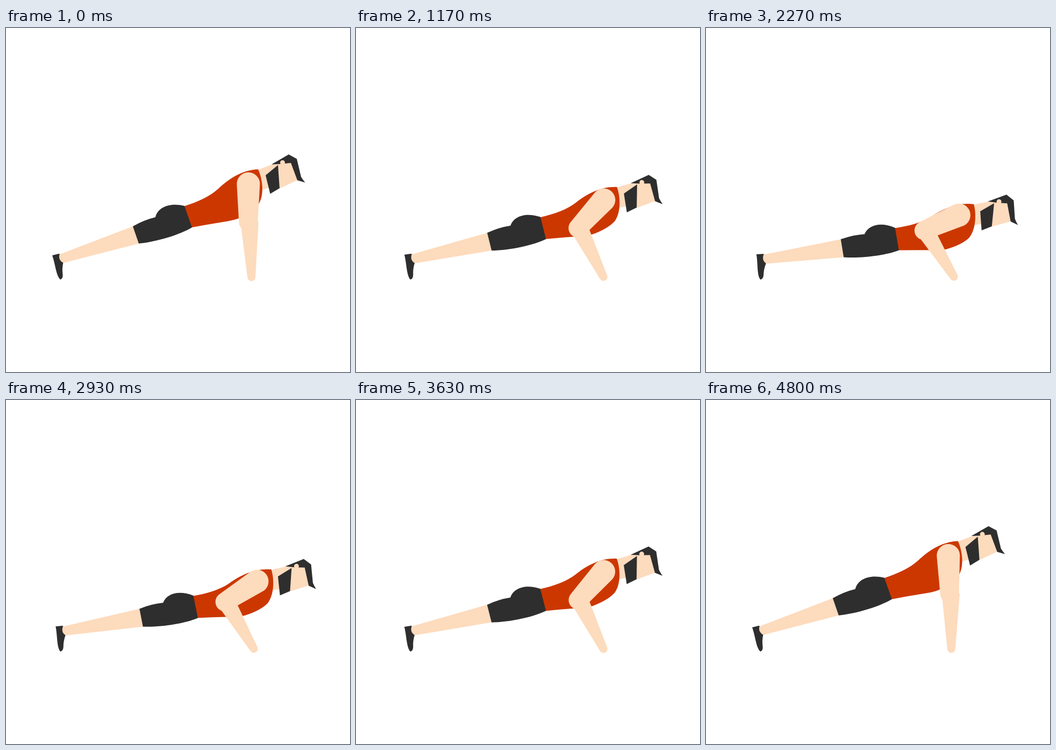
Recreate the animation shown at these times as an HTML page with a canvas. Size 640 by 640 pixels, loop 4830 ms.

```html
<!DOCTYPE html>
<html lang="en">
<head>
<meta charset="utf-8">
<title>Push-up</title>
<style>
html, body { margin: 0; width: 100%; height: 100%; overflow: hidden; background: #fff; }
canvas { display: block; }
</style>
</head>
<body>
<canvas id="stage" width="640" height="640"></canvas>
<script>
const ctx = document.getElementById('stage').getContext('2d');
const LOOP = 4830, LOWEST = 2390, SPEED = 0.00426; // ms, ms, degrees per ms
const SKIN = '#fddbbd', RED = '#cc3700', DARK = '#2e2e2e';
const TOE = { x: 101, y: 468 }, SHOULDER = { x: 450, y: 283.5 }, WRIST = { x: 457.6, y: 454.5 };
const UPPER = 77.55, FORE = 93.67;

// Body in its raised pose, back to front
const body = [
  [DARK, 'M86,423 L98,420 Q101,420 100,424 L106.5,436 Q104,448 105.5,458 Q106.5,466 101,468 C93,460 92,440 86,423Z'],
  [SKIN, 'M100,421 L238,368.2 L249,400.5 L107,437 Q98,433 99,423Z'],
  [SKIN, 'M466,265 L497,253 L531,251 L542,283 L508,299 L490,297 L473,302Z'],
  [RED, 'M330,332 C356,324 380,313 395,299 C415,280 440,264 469,263 C477,280 481,308 471,326 Q460,341 433,354 Q424,358 400,361.5 Q372,366 344,371.3Z'],
  [DARK, 'M236,369 Q257,357 278,352 C282,334 304,324 332,331 L346,371 C325,384 280,398 247,401Z'],
  [DARK, 'M494,253.7 L526,235.3 L541,243.5 L549,277 Q552,282 556.5,287.5 L542,283.3 L530,251 L511,253Z'],
  [DARK, 'M506,255 L483,274 L491.5,308.5 L509,298Z'],
  [SKIN, 'M510,250.5 a4.5,4.5 0 1 1 9,0 a4.5,4.5 0 1 1 -9,0Z']
].map(([color, d]) => [color, new Path2D(d)]);

function drawBody(angle) {
  ctx.save();
  ctx.translate(TOE.x, TOE.y);
  ctx.rotate(angle);
  ctx.translate(-TOE.x, -TOE.y);
  for (const [color, path] of body) {
    ctx.fillStyle = color;
    ctx.fill(path);
  }
  ctx.restore();
}

// Draws a limb whose bone runs along +x from the joint
function drawLimb(joint, angle, trace) {
  ctx.save();
  ctx.translate(joint.x, joint.y);
  ctx.rotate(angle);
  ctx.beginPath();
  trace();
  ctx.fill();
  ctx.restore();
}

// Two-bone arm: the shoulder rides on the body, the wrist stays planted
function drawArm(bodyAngle) {
  const dx = SHOULDER.x - TOE.x, dy = SHOULDER.y - TOE.y;
  const cos = Math.cos(bodyAngle), sin = Math.sin(bodyAngle);
  const shoulder = { x: TOE.x + dx * cos - dy * sin, y: TOE.y + dx * sin + dy * cos };
  const reachX = WRIST.x - shoulder.x, reachY = WRIST.y - shoulder.y;
  const reach = Math.min(Math.hypot(reachX, reachY), UPPER + FORE);
  const bend = Math.acos(Math.min(1, (UPPER ** 2 + reach ** 2 - FORE ** 2) / (2 * UPPER * reach)));
  const upperAngle = Math.atan2(reachY, reachX) + bend;
  const elbow = {
    x: shoulder.x + UPPER * Math.cos(upperAngle),
    y: shoulder.y + UPPER * Math.sin(upperAngle)
  };
  const foreAngle = Math.atan2(WRIST.y - elbow.y, WRIST.x - elbow.x);
  const quarter = Math.PI / 2;

  ctx.fillStyle = SKIN;
  drawLimb(elbow, foreAngle, () => {
    ctx.moveTo(0, 14.5);
    ctx.lineTo(0, -19);
    ctx.arc(102.5, 1.6, 7.5, -quarter, quarter);
  });
  drawLimb(shoulder, upperAngle, () => {
    ctx.arc(6.5, -0.8, 21.5, quarter, 3 * quarter);
    ctx.arc(UPPER, 0, 17.5, -quarter, quarter);
  });
}

function draw(now) {
  const time = now % LOOP;
  const degrees = SPEED * (LOWEST - Math.abs(time - LOWEST));
  const angle = degrees * Math.PI / 180;
  ctx.clearRect(0, 0, 640, 640);
  drawBody(angle);
  drawArm(angle);
  requestAnimationFrame(draw);
}

const start = performance.now();
draw(0);
function tick() {}
</script>
</body>
</html>
```
